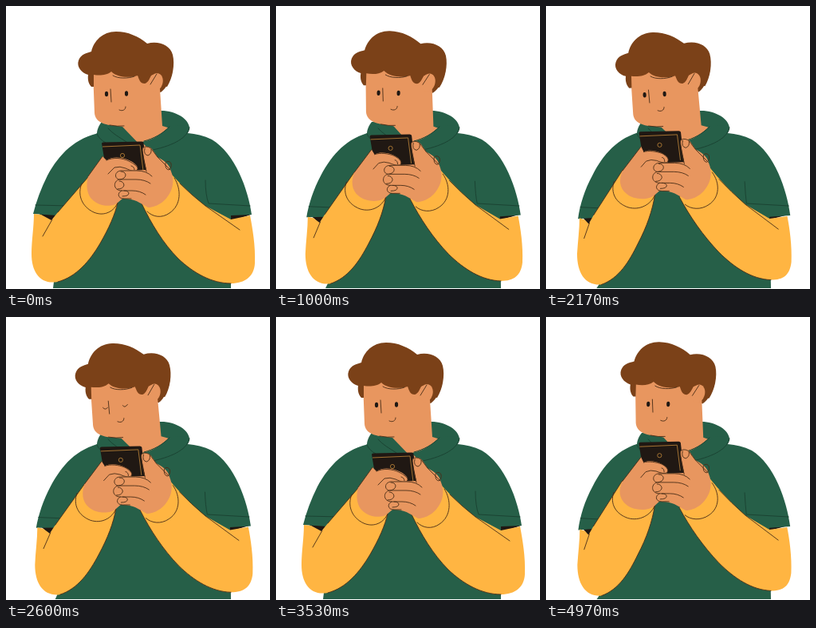
These frames come from a looping animation (331 px wide and 354 px high, 5 s). An HTML page:

```html
<!DOCTYPE html>
<html lang="en">
<head>
<meta charset="utf-8">
<title>Texting</title>
<style>
  html, body { margin: 0; width: 100%; height: 100%; overflow: hidden; background: #fff; }
  svg { display: block; width: 100vw; height: 100vh; }
  .green { fill: #265f48; }
  .skin { fill: #e8965f; }
  .hair { fill: #7b4118; }
  .yellow { fill: #ffb542; }
  .dark { fill: #201813; }
  .line { fill: none; stroke: #4a2e18; stroke-width: .9; stroke-linecap: round; stroke-linejoin: round; }
  .seam { fill: none; stroke: #1b4433; stroke-width: 1; stroke-linecap: round; }
  .gold { fill: none; stroke: #b07c36; stroke-width: .9; }
</style>
</head>
<body>
<svg viewBox="0 0 331 354">
  <g id="torso"></g>
  <path class="green" d="M192 131C212 130 229 141 230 152C229 164 214 174 180 183L168 172L190 140Z"/>
  <path class="green" d="M120 145C114 152 112 162 116 166L130 175L175 180L160 145Z"/>
  <path class="seam" d="M128 153C134 160 142 164 151 170M114 160Q117 167 125 171"/>

  <g id="head">
    <path class="hair" d="M186 70L209 80C207 92 201 103 194 108L184 104Z"/>
    <path class="skin" d="M109 82L111 134C112 145 123 149 139 150L146 151L172 178L206 153L196 150L193 104L188 72L150 68Z"/>
    <path class="hair" d="M107 101C104 98 102 93 103 86C95 84 88 76 91 68C94 60 101 59 107 57C110 44 121 32 138 32C153 32 166 38 177 47C191 43 206 49 209 61C212 73 209 90 202 101L197 100C196 88 189 83 182 87C180 91 178 96 174 97C168 97 167 92 165 87C156 90 140 90 132 82C126 87 117 87 110 86L110 101Z"/>
    <path class="skin" d="M178 99C179 90 184 84 190 84C196 85 198 92 196 98C194 104 190 107 184 106Z"/>
    <path class="line" d="M181 98L189 85M134 87C140 91 153 91 161 88M131 104L132 120M142 130C146 132 150 130 150 126M130 149Q140 151 148 150"/>
    <g id="open" class="dark">
      <ellipse cx="126" cy="110" rx="2.1" ry="3.2"/>
      <ellipse cx="151" cy="109.5" rx="2.1" ry="3.2"/>
    </g>
    <path id="closed" class="line" d="M124 112Q127 116 130 112M149 110Q151 114 155 109"/>
  </g>

  <path class="green" d="M205 150C216 150 229 147 230 153C228 166 208 175 182 182L170 170C184 168 196 160 205 150Z"/>
  <path class="seam" d="M205 151C196 160 185 166 173 169M230 152C228 164 212 174 184 180"/>

  <g id="phone">
    <path class="dark" d="M120 172Q120 170.500 122 170.500L170 169.500Q172 169.500 172.500 171L177 210L126 208Z"/>
    <path class="gold" d="M121 176L168 174L172 206"/>
    <circle class="gold" cx="146" cy="187" r="2.6"/>
  </g>

  <g id="leftArm"></g>
  <g id="rightArm"></g>
  <g id="rightHand">
    <path class="skin" d="M171 180C171 174 181 175 184 180L190 189C197 193 205 197 207 207C210 214 210 221 208 228C203 243 190 252 178 252C167 246 162 241 148 241C140 241 139 234 145 231C134 231 134 219 142 217C135 216 136 206 145 206L176 205Z"/>
    <path class="line" d="M171 180C171 174 181 175 184 181L190 189L206 205M171 180Q172 194 176 207M183 213Q176 206 164 206L145 206C136 206 135 216 142 217M181 222Q174 217 163 217L142 217C134 219 134 231 145 231M175 236Q168 231 158 231L145 231C139 234 140 241 148 241L157 241M143 217Q150 216 150 211Q149 207 144 207M140 229Q147 229 148 224Q147 219 142 219M146 238Q154 238 154 234Q153 231 148 231M174 178Q172 186 178 187Q183 185 182 179M200 196Q199 204 204 205Q208 203 207 197Q205 193 201 195"/>
  </g>
</svg>
<script>
const LOOP = 5000, SWAY = 3530;
const byId = id => document.getElementById(id);

// Blends two paths that share the same commands.
function mix(a, b, k) {
  const target = b.match(/-?[\d.]+/g);
  let i = 0;
  return a.replace(/-?[\d.]+/g, n => (+n + (target[i++] - n) * k).toFixed(2));
}

// [group, class, path with hands low, path with hands high]
const shapes = [
  ['torso', 'dark',
    'M40 259L66 258L56 269Z',
    'M45 263L66 261L53 274Z'],
  ['torso', 'dark',
    'M268 259L307 261L283 269Z',
    'M262 259L303 261L280 267Z'],
  ['torso', 'green',
    'M120 158C86 165 67 185 52 212C44 228 38 244 34 260L64 262L100 262L90 320L60 345L59 353L282 353L282 262L308 261C304 230 287 184 258 167C248 162 238 160 228 159L160 170Z',
    'M120 157C90 165 73 185 59 212C49 230 43 250 41 267L62 265L100 262L90 320L70 345L64 353L282 353L280 264L306 262C302 230 286 184 258 167C248 162 238 160 228 159L160 170Z'],
  ['torso', 'seam',
    'M37 249L80 250M250 218Q250 236 254 247L306 250',
    'M44 252L80 254M249 220Q250 236 251 247L304 250'],
  ['leftArm', 'yellow',
    'M35 260L44 261L57 268L65 258L103 214L125 235L140 246C137 260 129 278 118 297C105 319 88 339 65 345C43 349 32 333 32 310C32 294 35 276 35 260Z',
    'M43 266L49 268L53 273L59 262L95 204L115 225L136 235C133 255 126 276 115 297C104 320 92 341 70 349C50 350 40 334 40 310C41 295 43 280 43 266Z'],
  ['leftArm', 'line',
    'M95 222C89 236 95 251 110 258C124 264 136 256 140 246C137 260 129 278 118 297C105 319 88 339 65 345M46 288L58 267M65 258L103 214',
    'M84 219C79 234 87 246 102 251C117 255 131 247 136 235C133 255 126 276 115 297C104 320 92 341 70 349M48 291L54 272M59 262L95 204'],
  ['leftArm', 'skin',
    'M103 213L121 188L126 193C133 188 144 189 152 192C160 195 166 200 165 204L160 212L152 236L140 246C134 252 118 251 109 243C101 236 100 224 103 213Z',
    'M95 205L119 174L122 181C128 178 138 180 144 183C150 186 153 190 151 193L148 204L146 226L136 235C129 242 109 242 100 234C90 226 90 215 95 205Z'],
  ['leftArm', 'line',
    'M126 193C134 189 146 190 154 194C160 197 166 201 165 204C163 208 156 206 150 203Q143 200 136 202L128 210M157 200Q161 201 161 205M103 213L121 188',
    'M122 181C128 179 138 181 144 183C150 186 153 190 151 193C149 196 142 194 137 192Q130 190 124 193L118 200M144 188Q147 188 147 193M95 205L119 174'],
  ['rightArm', 'yellow',
    'M207 210C218 222 232 236 250 250L282 267L306 262C309 278 313 300 312 322C311 338 300 347 282 347C258 347 235 334 216 316C197 297 182 272 170 247L196 225Z',
    'M205 201C217 216 232 232 250 248L280 266L302 263C305 278 308 300 307 320C305 336 298 342 282 342C258 341 236 326 217 307C197 286 180 262 167 238L192 215Z'],
  ['rightArm', 'line',
    'M211 215C220 229 220 249 205 259C195 266 184 264 177 257M218 222Q232 236 250 250L293 280M282 347C258 347 235 334 216 316C197 297 182 272 170 247',
    'M208 207C218 220 218 238 204 247C194 254 181 253 174 247M217 216Q232 232 250 248L291 279M282 342C258 341 236 326 217 307C197 286 180 262 167 238']
].map(([group, cls, low, high]) => {
  const path = document.createElementNS('http://www.w3.org/2000/svg', 'path');
  path.setAttribute('class', cls);
  byId(group).append(path);
  return { path, low, high };
});

const transform = (id, value) => byId(id).setAttribute('transform', value);
const shift = (id, dx, dy, k) => transform(id, `translate(${dx * k} ${dy * k})`);

function draw(ms) {
  const angle = ms / SWAY * 2 * Math.PI;
  const lift = (1 - Math.cos(angle)) / 2;
  const tilt = 1.65 * Math.tanh(2.2 * Math.sin(angle)) / Math.tanh(2.2);
  const blink = ms > 2470 && ms < 2730;

  for (const s of shapes) s.path.setAttribute('d', mix(s.low, s.high, lift));
  shift('phone', -4, -15, lift);
  shift('rightHand', -3, -11, lift);
  transform('head', `rotate(${tilt} 170 200)`);
  byId('open').style.display = blink ? 'none' : '';
  byId('closed').style.display = blink ? '' : 'none';
}

const start = performance.now();
function tick() {
  draw((performance.now() - start) % LOOP);
  requestAnimationFrame(tick);
}
tick();
</script>
</body>
</html>
```
